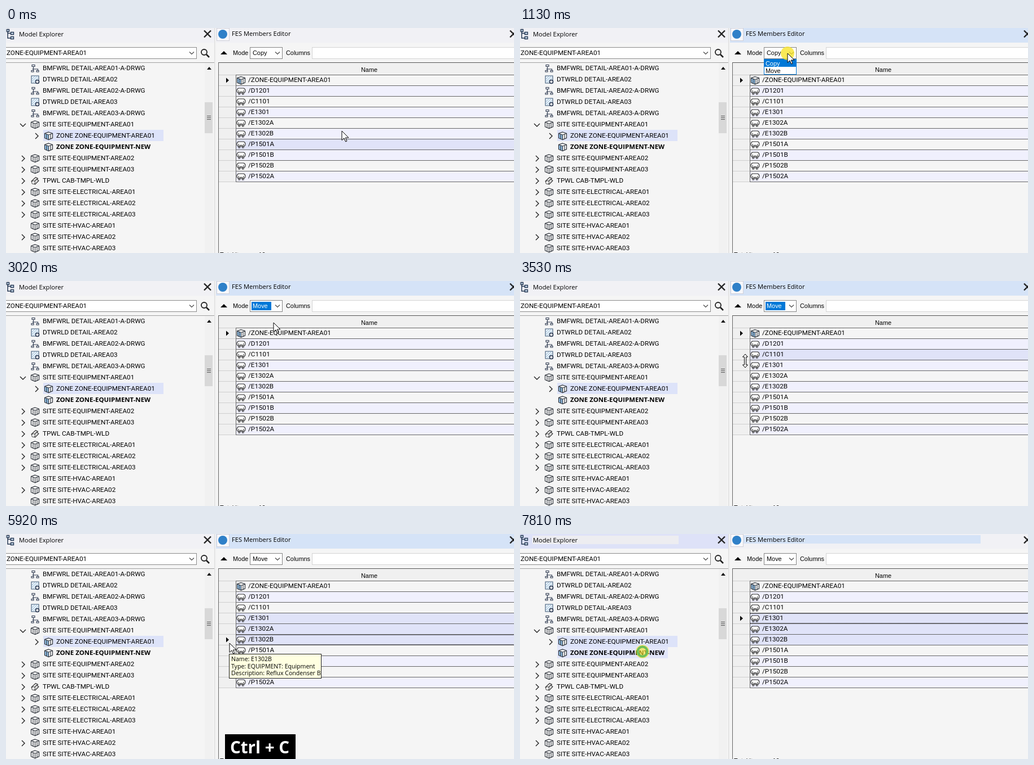
These frames come from a looping animation (900x400 px, 8 s). An HTML page:

```html
<!DOCTYPE html>
<html lang="en">
<head>
<meta charset="utf-8">
<title>Members editor</title>
<style>
html, body { margin: 0; width: 100%; height: 100%; overflow: hidden; background: #f5f5f5; }
svg { display: block; width: 900px; height: 400px; }
text { font: 10.9px "Liberation Sans", Arial, sans-serif; font-kerning: none; fill: #000; white-space: pre; }
.title { font: 11.15px "Open Sans", "Noto Sans", sans-serif; }
.tip { font: 10.55px "Open Sans", "Noto Sans", sans-serif; }
.item { font: 11.7px Roboto, sans-serif; }
.bold { font: bold 11.42px "Open Sans", "Noto Sans", sans-serif; }
.keys { font: bold 29.5px "Open Sans", "Noto Sans", sans-serif; fill: #fff; }
.white { fill: #fff; }
rect { shape-rendering: crispEdges; }
</style>
</head>
<body>
<svg id="stage" viewBox="0 0 900 400"></svg>
<script>
const LOOP = 8000;
const ROW_TOP = 83, ROW_H = 19;
const SELECTED = '#e0e3f8', ACTIVE = '#d5e3f7', INACTIVE = '#f1f1f5';
const stage = document.getElementById('stage');

function el(tag, attrs, parent = stage, content) {
  const node = document.createElementNS('http://www.w3.org/2000/svg', tag);
  for (const key in attrs) node.setAttribute(key, attrs[key]);
  if (content !== undefined) node.textContent = content;
  parent.appendChild(node);
  return node;
}
const group = (parent = stage) => el('g', {}, parent);
const rect = (x, y, width, height, fill, parent) => el('rect', { x, y, width, height, fill }, parent);
const text = (x, y, content, cls = '', parent) => el('text', { x, y, class: cls }, parent, content);
const path = (d, stroke = '#333', width = 1, fill = 'none', parent) =>
  el('path', { d, stroke, 'stroke-width': width, fill }, parent);
function box(x, y, w, h, border, fill, parent) {
  rect(x, y, w, h, border, parent);
  return rect(x + 1, y + 1, w - 2, h - 2, fill, parent);
}
const show = (node, on) => node.setAttribute('display', on ? 'inline' : 'none');
const place = (node, x, y) => node.setAttribute('transform', `translate(${x} ${y})`);

function cube(g, side) {
  path('M0-6.5L7-4V4L0 7L-7 4V-4Z', '#2b3038', 1.2, '#f9f9f9', g);
  path('M-6.5-3.5L0-1.5V6.5L-6.5 3.6Z', 'none', 0, side, g);
  path('M-7-4L0-1.5L7-4M0-1.5V7M-3.5-2.7V5.5M3.5-2.7V5.5', '#2b3038', 1.1, 'none', g);
}
// Icons are drawn around their own centre.
const icons = {
  tree(g) {
    path('M-3-3V5M-5 1.5H5V5', '#2e3a50', 1.1, 'none', g);
    path('M-5.5-6h5v3h-5zM-6.5 4h4v2.5h-4zM2.5 4h4v2.5h-4z', '#2e3a50', 1.1, '#f5f5f5', g);
  },
  drawing(g) {
    path('M-6.5-6.5h13v13h-13z', '#3c5876', 1.1, '#eaf3fa', g);
    path('M-6 0L0-6M-6 4L4-6M-3 5L5-3', '#8fb3d0', 1, 'none', g);
    el('circle', { cx: 4, cy: 4, r: 3, fill: '#fff', stroke: '#22304a', 'stroke-width': 1.5 }, g);
  },
  cube: g => cube(g, '#f9f9f9'),
  zone: g => cube(g, '#8fbbe0'),
  template(g) {
    path('M-6.5 1L1-6L5-4L-2.5 3.5Z', '#333', 1.1, '#eee', g);
    path('M-4 4L3-3L6.5 0L0 6.5Z', '#333', 1.1, '#ddd', g);
    el('circle', { cx: -3, cy: 3, r: 3, fill: '#f5f5f5', stroke: '#333' }, g);
  },
  vessel(g) {
    path('M-4.5-5H4.5Q7.5-4 7.5-.5T4.5 3.5H-4.5Q-7.5 3-7.5-.5T-4.5-5Z', '#333', 1.1, '#fafafa', g);
    path('M-4.5-1V6H-2V1.5H2V6H4.5V-1', '#333', 1.1, 'none', g);
  }
};
function icon(name, x, y) {
  const g = group();
  place(g, x, y);
  icons[name](g);
}

rect(0, 0, 900, 400, '#f5f5f5');

// Title bars
const leftBar = rect(0, 0, 369, 26, INACTIVE);
const rightBar = rect(371, 0, 529, 26, INACTIVE);
const patches = group();
rect(22, 3, 259, 15, '#ededf1', patches);
rect(396, 2, 420, 15, ACTIVE, patches);
rect(369, 0, 1, 400, '#dcdcdc');
rect(370, 0, 2, 400, '#f0f0f0');
path('M3 2V18H8M3 9.5H8', '#243752', 1.5);
path('M1.5 2.5h4v4h-4zM8.5 7.5h5v4h-5zM8.5 15.5h5v4h-5z', '#243752', 1.4, '#cfe0f0');
text(23, 15, 'Model Explorer', 'title');
box(373, 0, 23, 23, '#d0d0d8', '#f8f8fb');
el('circle', { cx: 384, cy: 11, r: 8, fill: '#2f80c8' });
text(400, 14, 'FES Members Editor', 'title');
const cross = x => path(`M${x - 6} 4.5L${x + 6} 16.5M${x + 6} 4.5L${x - 6} 16.5`, '#222', 2.4);
cross(357);
cross(899);

// Search field
box(-1, 34, 339, 21, '#8a8a8a', '#fff');
text(1, 48, 'ZONE-EQUIPMENT-AREA01', 'item');
path('M325 42.5l4 4l4-4', '#444', 1.1);
el('circle', { cx: 351, cy: 43, r: 5, fill: 'none', stroke: '#222', 'stroke-width': 1.8 });
path('M355 47l5 5', '#222', 2.6);

// Tree
rect(0, 61, 369, 1, '#a0a0a0');
rect(66, 181, 213, 20, '#dde3f9');
const newHover = rect(66, 201, 196, 20, '#e2e6fa');
const site = (kind, n) => ['cube', `SITE SITE-${kind}-AREA0${n}`, 'right'];
const tree = [
  ['tree', 'BMFWRL DETAIL-AREA01-A-DRWG'],
  ['drawing', 'DTWRLD DETAIL-AREA02'],
  ['tree', 'BMFWRL DETAIL-AREA02-A-DRWG'],
  ['drawing', 'DTWRLD DETAIL-AREA03'],
  ['tree', 'BMFWRL DETAIL-AREA03-A-DRWG'],
  ['cube', 'SITE SITE-EQUIPMENT-AREA01', 'down'],
  ['zone', 'ZONE ZONE-EQUIPMENT-AREA01', 'right'],
  ['zone', 'ZONE ZONE-EQUIPMENT-NEW'],
  site('EQUIPMENT', 2), site('EQUIPMENT', 3),
  ['template', 'TPWL CAB-TMPL-WLD', 'right'],
  site('ELECTRICAL', 1), site('ELECTRICAL', 2), site('ELECTRICAL', 3),
  site('HVAC', 1).slice(0, 2), site('HVAC', 2), site('HVAC', 3).slice(0, 2)
];
tree.forEach(([kind, label, arrow], i) => {
  const y = 71 + 20 * i, shift = kind === 'zone' ? 24 : 0;
  icon(kind, 51.5 + shift, y + 0.5);
  text(65 + shift, y + 4, label, label.endsWith('NEW') ? 'bold' : 'item');
  if (arrow === 'right') path(`M${28 + shift} ${y - 4}l5 5l-5 5`, '#222', 1.4);
  if (arrow === 'down') path(`M25 ${y - 1}l5 5l5-5`, '#222', 1.4);
});
rect(352, 62, 15, 338, '#f1f1f1');
path('M356 74h8l-4-5z', 'none', 0, '#111');
rect(352, 132, 14, 55, '#d8d8d8');
for (let y = 156; y < 163; y += 3) rect(356, y, 7, 1, '#555');

// Toolbar
path('M380 47h12l-6-6z', 'none', 0, '#000');
text(402, 48, 'Mode');
box(432, 34, 58, 21, '#858585', '#fff');
const comboFocus = rect(435, 37, 35, 15, '#0078d7');
const comboText = text(437, 48, 'Copy');
path('M477 42.5l4 4l4-4', '#444', 1.1);
text(496, 48, 'Columns');
box(542, 34, 370, 21, '#d4d4d4', '#fff');

// Grid
rect(376, 61, 524, 22, '#f0f0f0');
rect(376, 61, 524, 1, '#555');
text(629, 78, 'Name');
const names = ['ZONE-EQUIPMENT-AREA01', 'D1201', 'C1101', 'E1301', 'E1302A', 'E1302B',
  'P1501A', 'P1501B', 'P1502B', 'P1502A'];
rect(377, 83, 30, 190, '#f0f0f0');
const rowFills = names.map((name, i) => {
  const y = ROW_TOP + ROW_H * i;
  const fill = rect(408, y, 492, ROW_H, '#f5f5f5');
  icon(i ? 'vessel' : 'zone', 416.5, y + 10);
  text(429, y + 13, '/' + name, 'item');
  return fill;
});
for (let i = 0; i <= names.length; i++) {
  const y = ROW_TOP + ROW_H * i;
  rect(377, y, 30, 1, '#cfcfcf');
  rect(407, y, 493, 1, '#666');
}
rect(376, 61, 1, 339, '#666');
rect(407, 83, 1, 190, '#666');
const focusRow = el('path', {
  d: 'M408 1.5H900M408 18.5H900', stroke: '#000', 'stroke-dasharray': '1 1', 'stroke-width': 1
});
const rowMarker = path('M390 5.5v9l5-4.5z', 'none', 0, '#000');
text(379, 407, 'Total items :   10');

// Drop-down list
const list = group();
box(432, 55, 58, 28, '#0078d7', '#fff', list);
const listMark = rect(433, 56, 56, 13, '#0078d7', list);
const options = [text(435, 67, 'Copy', '', list), text(435, 80, 'Move', '', list)];

// Tooltip
const tip = group();
box(0, 0, 164, 44, '#222', '#ffffe1', tip);
const tipLines = [13, 26, 38].map(y => text(4, y, '', 'tip', tip));

const keys = group();
rect(388, 356, 125, 44, '#000', keys);
text(397, 390, 'Ctrl + C', 'keys', keys);

// Pointers
const glow = el('circle', { r: 12, fill: '#f7e32c' });
const arrow = path('M0 0V16.5L4 12.8L6.6 19L9 18L6.4 12H12Z', '#000', 1, '#fff');
const resize = path('M0-12L4.5-7H1.5V7H4.5L0 12L-4.5 7H-1.5V-7H-4.5Z', '#000', 1, '#fff');
const busy = el('circle', { cx: 217, cy: 209, r: 8.5, fill: 'none', stroke: '#6fbf58', 'stroke-width': 4 });

// Pointer keys: time, x, y, hovered row
const pointer = [
  [0, 595, 183, 6], [130, 586, 171, 4], [260, 552, 135, 2], [380, 506, 82, -1], [500, 479, 51, -1],
  [630, 474, 45, -1], [1640, 474, 50, -1], [1770, 474, 63, -1], [1890, 474, 71, -1],
  [2640, 474, 74, -1], [3160, 466, 78, -1], [3290, 442, 95, 0], [3410, 414, 120, 1],
  [3530, 399, 142, 2], [3660, 396, 144, 3], [4410, 396, 171, 3], [4540, 396, 194, 3],
  [7060, 383, 195, -1], [7190, 321, 200, -1], [7310, 246, 207, -1], [7440, 217, 208, -1]
];
// Highlight keys: time, opacity
const glowKeys = [
  [0, 0], [880, 0.45], [1010, 0.8], [1260, 0], [2260, 0.8], [2770, 0.5], [2890, 0.25], [3020, 0],
  [4030, 0.8], [5030, 0], [7810, 0.65]
];
// Selection keys: time, last selected row, current row
const selectKeys = [[0, -1, 0], [4030, 3, 3], [4410, 4, 4], [4540, 5, 5], [6040, 5, 3]];

const at = (list, t) => list.filter(key => key[0] <= t).pop();
const within = (t, from, to) => t >= from && t < to;

function render(t) {
  const [, x, y, hover] = at(pointer, t);
  const [, last, current] = at(selectKeys, t);
  const ended = t >= 7810;

  leftBar.setAttribute('fill', ended ? '#dee2f8' : INACTIVE);
  rightBar.setAttribute('fill', within(t, 880, 7810) ? ACTIVE : INACTIVE);
  show(patches, ended);
  show(newHover, t >= 7440);

  const moved = t >= 2640, focused = within(t, 2640, 4030);
  comboText.textContent = moved ? 'Move' : 'Copy';
  comboText.setAttribute('class', focused ? 'white' : '');
  show(comboFocus, focused);

  const option = t >= 1890 ? 1 : 0;
  show(list, within(t, 1010, 2640));
  listMark.setAttribute('y', 56 + 13 * option);
  options.forEach((node, i) => node.setAttribute('class', i === option ? 'white' : ''));

  rowFills.forEach((node, i) => {
    const lit = last < 0 ? i === hover : i >= 3 && i <= last;
    node.setAttribute('fill', lit ? SELECTED : i % 2 ? '#f0f0fd' : '#f5f5f5');
  });
  const markY = ROW_TOP + ROW_H * current;
  place(rowMarker, 0, markY);
  place(focusRow, 0, markY);
  show(focusRow, last >= 0);

  const second = t >= 5030;
  const item = second ? 'B' : 'A';
  show(tip, within(t, 4540, 6040));
  place(tip, second ? 395 : 397, second ? 213 : 191);
  ['Name: E1302' + item, 'Type: EQUIPMENT: Equipment', 'Description: Reflux Condenser ' + item]
    .forEach((line, i) => { tipLines[i].textContent = line; });
  show(keys, within(t, 5920, 6920));

  const resizing = within(t, 3530, 3660);
  place(glow, x, y + (ended ? 1 : 0));
  glow.setAttribute('opacity', at(glowKeys, t)[1]);
  place(arrow, x, y);
  place(resize, x, y);
  show(arrow, !resizing && !ended);
  show(resize, resizing);
  show(busy, ended);
}

const start = performance.now();
function tick() {
  render((performance.now() - start) % LOOP);
  requestAnimationFrame(tick);
}
tick();
</script>
</body>
</html>
```
